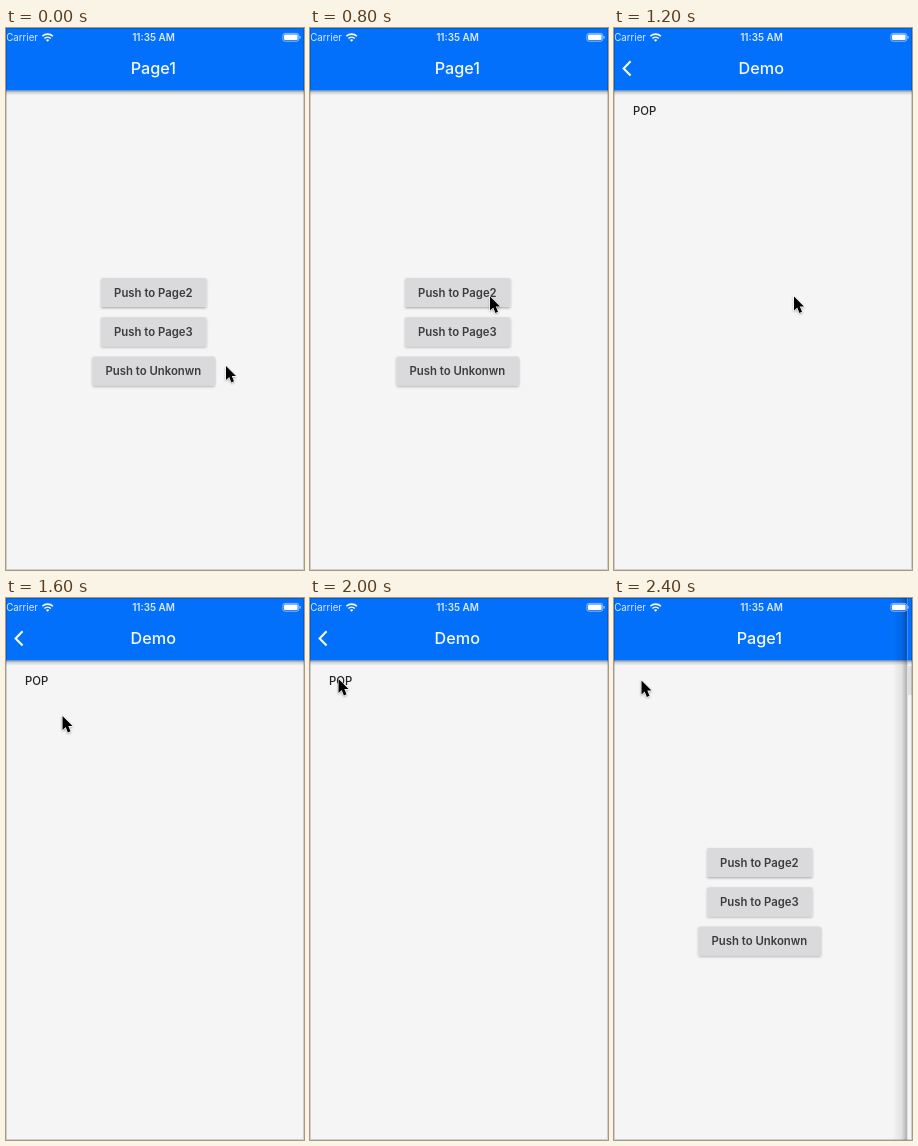
Animation, 298 px wide and 542 px high, one loop 2600 ms. Source, as an HTML page:

```html
<!DOCTYPE html>
<html lang="en">
<head>
<meta charset="utf-8">
<title>Page navigation</title>
<style>
  html, body { margin: 0; width: 100%; height: 100%; overflow: hidden; background: #f5f5f5; }
  svg { display: block; width: 298px; height: 542px; }
  text { font-family: Inter, Roboto, "Liberation Sans", sans-serif; }
  .title { font-size: 16.2px; font-weight: 500; fill: #f4f9ff; text-anchor: middle; }
  .label { font-size: 11.35px; font-weight: 600; fill: #3c3c3e; text-anchor: middle; }
  .flat { font-weight: 500; fill: #222; }
  .status { font-size: 9.7px; fill: #d9eaff; }
  .clock { font-size: 9.9px; font-weight: 600; text-anchor: middle; }
</style>
</head>
<body>
<svg viewBox="0 0 298 542">
  <defs>
    <linearGradient id="under" x2="0" y2="1">
      <stop offset="0" stop-color="#000" stop-opacity=".42"/>
      <stop offset=".35" stop-color="#000" stop-opacity=".16"/>
      <stop offset="1" stop-color="#000" stop-opacity="0"/>
    </linearGradient>
    <linearGradient id="side">
      <stop offset="0" stop-color="#000" stop-opacity="0"/>
      <stop offset=".6" stop-color="#000" stop-opacity=".08"/>
      <stop offset="1" stop-color="#000" stop-opacity=".3"/>
    </linearGradient>
    <filter id="lift" x="-10%" y="-20%" width="120%" height="150%">
      <feDropShadow dx="0" dy="1.2" stdDeviation="1" flood-opacity=".3"/>
    </filter>
    <filter id="soft" x="-50%" y="-50%" width="200%" height="200%">
      <feDropShadow dx="0" dy="1" stdDeviation="1" flood-opacity=".35"/>
    </filter>
    <g id="sheet">
      <rect x="-4.5" width="304" height="542" fill="#f5f5f5"/>
      <rect x="-4.5" y="62.5" width="304" height="5" fill="url(#under)"/>
      <rect x="-4.5" width="304" height="62.5" fill="#0370fb"/>
    </g>
  </defs>

  <g id="home">
    <use href="#sheet"/>
    <text class="title" x="147.3" y="46">Page1</text>
    <g id="buttons"></g>
  </g>

  <g id="demo">
    <rect x="-19.5" width="15" height="542" fill="url(#side)"/>
    <use href="#sheet"/>
    <path d="M16.6 33.2 9.6 40.4 16.6 47.6" fill="none" stroke="#f4f9ff" stroke-width="2.1"/>
    <text class="title" x="147.3" y="46">Demo</text>
    <rect id="press" x="-4.5" y="68" width="71" height="29" rx="1.6" fill="#dfdfdf"/>
    <text class="label flat" x="30.6" y="86.6">POP</text>
  </g>

  <g id="bar">
    <text class="status" x="0.3" y="13">Carrier</text>
    <g fill="none" stroke="#fff" stroke-width="1.6">
      <path d="M36.3 8.3a7.6 7.6 0 0 1 10.6 0"/>
      <path d="M38.4 10.5a4.6 4.6 0 0 1 6.4 0"/>
    </g>
    <path d="M41.6 13.8 39.9 12.1a2.4 2.4 0 0 1 3.4 0Z" fill="#fff"/>
    <text class="status clock" x="147.5" y="13">11:35 AM</text>
    <rect x="276.9" y="5.4" width="15.8" height="7.8" rx="1.9" fill="none" stroke="#a9cdfd" stroke-width=".8"/>
    <rect x="278" y="6.5" width="13.6" height="5.6" rx="1" fill="#fff"/>
    <rect x="293.4" y="7.9" width="1.2" height="2.8" rx=".6" fill="#a9cdfd"/>
  </g>

  <rect x=".5" y=".5" width="297" height="541" fill="none" stroke="#000" stroke-opacity=".16"/>

  <path id="cursor" d="M0 0V14L3.2 11 5.4 16.4 8 15.3 5.8 10.1H10Z" fill="#000"
        stroke="#fff" stroke-width="1" paint-order="stroke" stroke-linejoin="round" filter="url(#soft)"/>
</svg>
<script>
  const STEP = 200, WIDTH = 304;
  // cursor x, cursor y, slide of the upper page (WIDTH = gone)
  const steps = [
    [220, 338, WIDTH],
    [207, 298, WIDTH],
    [191, 286, WIDTH],
    [180, 268.5, WIDTH],
    [180, 268.5, WIDTH],
    [180, 268.5, 8],
    [180, 268.5, 0],
    [72, 152, 0],
    [56.5, 118, 0],
    [28.5, 81, 0],
    [28.5, 81, 0],
    [28.5, 81, 207.5],
    [27.5, 82.5, 298]
  ];
  const PRESS_STEP = 11;
  const $ = id => document.getElementById(id);

  const addButton = (label, y, w) => {
    $('buttons').insertAdjacentHTML('beforeend',
      `<rect x="${147.7 - w / 2}" y="${y}" width="${w}" height="29" rx="1.6" fill="#dad9db" filter="url(#lift)"/>
       <text class="label" x="147.4" y="${y + 18.8}">${label}</text>`);
  };
  addButton('Push to Page2', 250, 105.5);
  addButton('Push to Page3', 289.3, 105.5);
  addButton('Push to Unkonwn', 328.6, 122.5);

  const move = (id, x, y = 0) => $(id).setAttribute('transform', `translate(${x} ${y})`);

  function draw(now) {
    const i = Math.floor(now / STEP) % steps.length;
    const [x, y, slide] = steps[i];
    move('cursor', x, y);
    move('demo', slide);
    move('home', (slide - WIDTH) / 3);
    $('demo').style.display = slide < WIDTH ? '' : 'none';
    $('press').style.display = i >= PRESS_STEP ? '' : 'none';
  }

  const start = performance.now();
  function tick() {
    draw(performance.now() - start);
    requestAnimationFrame(tick);
  }
  tick();
</script>
</body>
</html>
```
